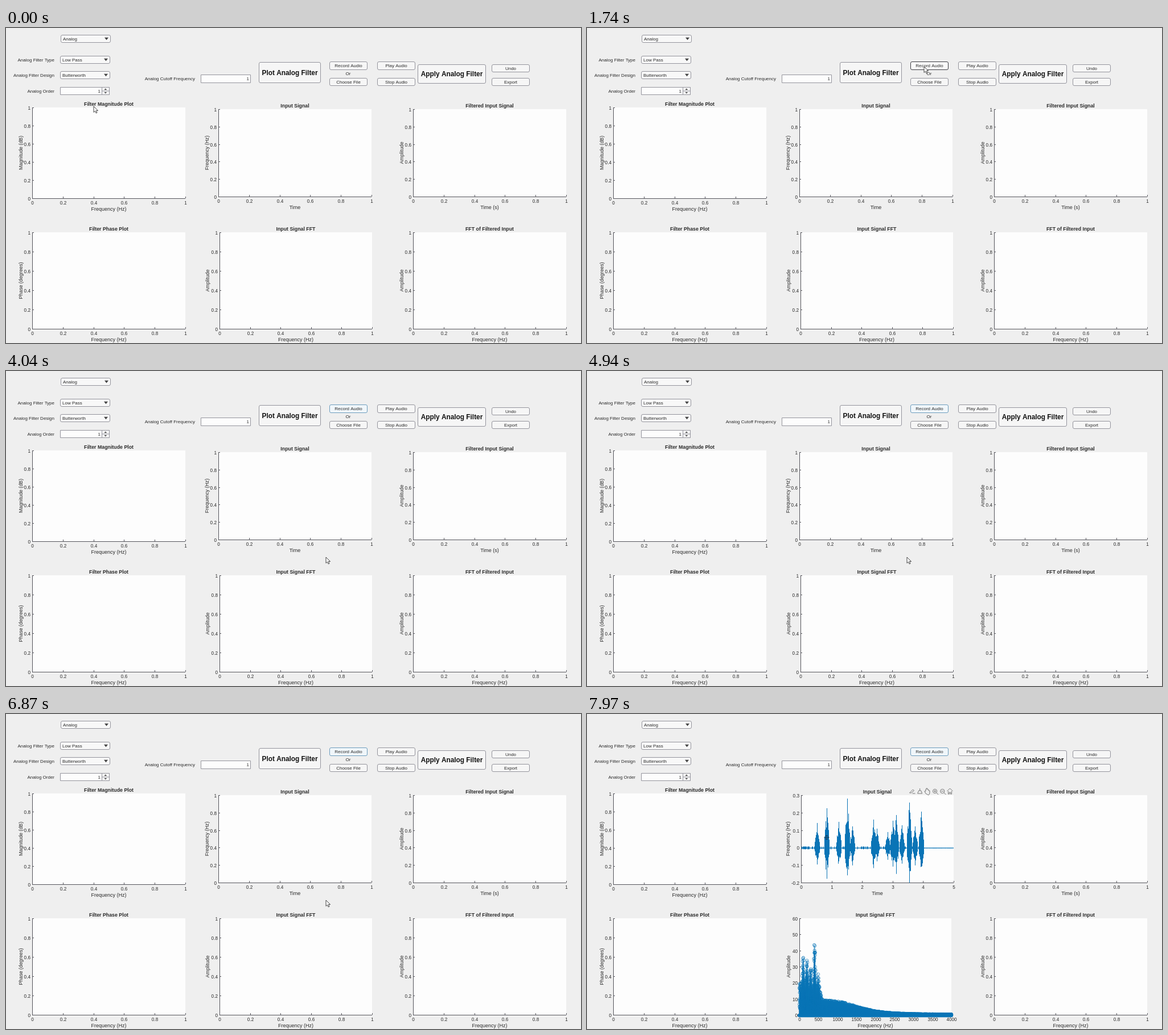
Write an HTML page with a canvas that moves like this. It is 1010 px wide and 555 px high and loops after 8000 ms.

```html
<!DOCTYPE html>
<html lang="en">
<head>
<meta charset="utf-8">
<title>Analog filter panel</title>
<style>
html, body { margin: 0; height: 100%; overflow: hidden; background: #efefef; }
canvas { display: block; }
</style>
</head>
<body>
<canvas id="stage" width="1010" height="555"></canvas>
<script>
const ctx = document.getElementById('stage').getContext('2d');
const FONT = '"Liberation Sans", Arial, sans-serif';
const BLUE = '#0a74b6', INK = '#2b2b2b', EDGE = '#94949c';
const LOOP = 8000, HOVER = 1620, CLICK = 2050, SIGNAL = 7340, FFT = 7430, TOOLS = 7700;

function text(str, x, y, size = 8, { align = 'center', bold = false, turn = 0 } = {}) {
  ctx.save();
  ctx.translate(x, y);
  ctx.rotate(turn);
  ctx.font = `${bold ? 'bold ' : ''}${size}px ${FONT}`;
  ctx.textAlign = align;
  ctx.fillStyle = size > 10 ? '#111' : INK;
  ctx.fillText(str, 0, size * 0.36);
  ctx.restore();
}

function strokePath(path, color, width = 1) {
  ctx.strokeStyle = color;
  ctx.lineWidth = width;
  ctx.stroke(path);
}

function box(x, y, w, h, radius, fill = '#f6f6f6', edge = EDGE) {
  const path = new Path2D();
  path.roundRect(x + 0.5, y + 0.5, w, h, radius);
  ctx.fillStyle = fill;
  ctx.fill(path);
  strokePath(path, edge);
}

function triangle(x, y, w, h) {
  ctx.beginPath();
  ctx.moveTo(x - w, y - h);
  ctx.lineTo(x + w, y - h);
  ctx.lineTo(x, y + h);
  ctx.fillStyle = '#444';
  ctx.fill();
}

function button(label, x, y, w = 66, h = 13, size = 8, fill, edge) {
  box(x, y, w, h, 2.5, fill, edge);
  text(label, x + w / 2 + 0.5, y + h / 2 + 0.5, size, { bold: size > 10 });
}

function dropdown(label, x, y) {
  box(x, y, 87, 13, 2.5, '#f8f8f8');
  text(label, x + 4, y + 7, 8, { align: 'left' });
  triangle(x + 80.5, y + 7, 3.5, 2.2);
}

function field(label, x, y, w, h, labelX, valueX) {
  const middle = y + h / 2 + 0.5;
  box(x, y, w, h, 0, '#fdfdfd');
  text(label, labelX, middle, 8, { align: 'right' });
  text('1', valueX, middle, 8, { align: 'right' });
}

function controls(t) {
  dropdown('Analog', 96, 12);
  dropdown('Low Pass', 95, 49);
  dropdown('Butterworth', 95, 76);
  text('Analog Filter Type', 85, 56.5, 8, { align: 'right' });
  text('Analog Filter Design', 85, 83, 8, { align: 'right' });
  field('Analog Cutoff Frequency', 342, 82, 87, 14, 332, 427);
  field('Analog Order', 95, 104, 86, 13, 85, 166);
  box(168, 104, 13, 13, 0);
  ctx.fillStyle = EDGE;
  ctx.fillRect(168, 110.5, 13, 1);
  for (const side of [-1, 1]) triangle(174.8, 111 + side * 3.3, 2.4, side * 1.3);

  button('Plot Analog Filter', 444, 60, 108, 36, 11.85);
  button('Apply Analog Filter', 723, 64, 119, 33, 11.85);
  const state = t >= CLICK ? ['#f0f6fa', '#6c9cbd'] : t >= HOVER ? ['#fafafa', '#3c3c42'] : [];
  button('Record Audio', 568, 59, 66, 14, 8, ...state);
  text('Or', 601, 80.5);
  button('Choose File', 568, 88);
  button('Play Audio', 652, 59, 66, 14);
  button('Stop Audio', 652, 88);
  button('Undo', 853, 64);
  button('Export', 853, 88);
}

// Scale: first value, step, number of ticks.
const UNIT = [0, 0.2, 6];

function axes(title, xName, yName, x, y, w, h, nameX, xScale = UNIT, yScale = UNIT) {
  const lines = new Path2D();
  const eachTick = ([first, step, count], mark) => {
    for (let i = 0; i < count; i++) mark(i / (count - 1), String(+(first + step * i).toFixed(1)));
  };
  ctx.fillStyle = '#fdfdfd';
  ctx.fillRect(x, y, w, h);
  lines.moveTo(x + 0.5, y);
  lines.lineTo(x + 0.5, y + h + 0.5);
  lines.lineTo(x + w, y + h + 0.5);
  eachTick(xScale, (part, label) => {
    const px = Math.round(x + w * part) + 0.5;
    lines.moveTo(px, y + h);
    lines.lineTo(px, y + h - 3);
    text(label, px, y + h + 8.5, 8.2);
  });
  eachTick(yScale, (part, label) => {
    const py = Math.round(y + h - h * part) + 0.5;
    lines.moveTo(x, py);
    lines.lineTo(x + 3, py);
    text(label, x - 3, py + 0.5, 8.2, { align: 'right' });
  });
  strokePath(lines, '#55555c');
  text(title, x + w / 2, y - 6.5, 8.8, { bold: true });
  text(xName, x + w / 2, y + h + 19, 9);
  text(yName, nameX, y + h / 2, 8.8, { turn: -Math.PI / 2 });
}

const noise = n => { const s = Math.sin(n * 127.1 + 11.3) * 43758.5453; return s - Math.floor(s); };

// Loudest moments of the recording: x, height.
const BURSTS = [
  [404, 44], [421, 70], [442, 46], [457, 87], [466, 38], [503, 50], [509, 34],
  [528, 28], [537, 48], [543, 58], [553, 40], [566, 80], [576, 38], [587, 64]
];

function signalPath() {
  const path = new Path2D();
  for (let x = 376; x < 644; x++) {
    let height = noise(x) < 0.4 && x < 594 ? 2.5 : 0.5;
    for (const [center, peak] of BURSTS) {
      const d = Math.abs(x - center) / 5;
      if (d < 1) height = Math.max(height, peak * (1 - d) ** 0.7 * (d ? 0.6 + 0.4 * noise(x + 50) : 1));
    }
    path.moveTo(x + 0.5, 236 - height);
    path.lineTo(x + 0.5, 236.5 + height * (0.5 + 0.3 * noise(x + 90)));
  }
  return path;
}

// Voice harmonics every 100 Hz above a plateau that rolls off.
const HARMONICS = [23, 15, 9, 30, 8];

function amplitude(hz) {
  const plateau = 11 * Math.exp(-((hz / 560) ** 12)) + 9 / (1 + (hz / 1600) ** 5) + 0.4;
  return HARMONICS.reduce((sum, h, i) => sum + h * Math.exp(-(((hz - 100 * (i + 1)) / 24) ** 2)), plateau);
}

function spectrumPaths() {
  const stems = new Path2D(), rings = new Path2D();
  const columns = 800;
  for (let i = 0; i < columns * 3; i++) {
    const part = (i % columns) / columns;
    const x = 373 + 267.5 * part;
    const y = 530.5 - 2.833 * amplitude(4000 * part) * (i < columns ? 0.65 + 0.35 * noise(i) : noise(i));
    stems.moveTo(x, 531);
    stems.lineTo(x, y);
    rings.moveTo(x + 2.6, y);
    rings.arc(x, y, 2.6, 0, 7);
    rings.moveTo(x + 2.6, 531);
    rings.arc(x, 531, 2.6, 0, 7);
  }
  return { stems, rings };
}

const signal = signalPath(), spectrum = spectrumPaths();

function plots(t) {
  const hz = 'Frequency (Hz)';
  axes('Filter Magnitude Plot', hz, 'Magnitude (dB)', 46, 140, 269, 160, 26);
  axes('Filtered Input Signal', 'Time (s)', 'Amplitude', 715, 143, 269, 154, 695);
  axes('Filter Phase Plot', hz, 'Phase (degrees)', 46, 360, 269, 170, 26);
  axes('FFT of Filtered Input', hz, 'Amplitude', 715, 360, 269, 170, 695);
  if (t < SIGNAL) {
    axes('Input Signal', 'Time', hz, 373, 143, 269, 154, 353);
  } else {
    axes('Input Signal', 'Time', hz, 376, 143, 268, 154, 353, [0, 1, 6], [-0.2, 0.1, 6]);
    strokePath(signal, BLUE);
  }
  if (t < FFT) {
    axes('Input Signal FFT', hz, 'Amplitude', 375, 360, 268, 170, 354);
  } else {
    axes('Input Signal FFT', hz, 'Amplitude', 373, 360, 267, 170, 354, [0, 500, 9], [0, 10, 7]);
    strokePath(spectrum.stems, BLUE, 0.7);
    strokePath(spectrum.rings, BLUE, 0.7);
  }
}

const ARROW = new Path2D('M0 0V10.5L2.5 8.3 4.2 12 6 11.2 4.3 7.6H7.6Z');
const CROSS = new Path2D('M-4.5 0H4.5M0-4.5V4.5M-3-2V2M3-2V2M-2-3H2M-2 3H2');
const LENS = 'm3.6 0a3.6 3.6 0 1 0-7.2 0a3.6 3.6 0 1 0 7.2 0m-1 2.5l3.5 3.5m-8-6h4';
const ICONS = [
  'm-5 3l6-6 2 2-5 4zm5 1h5',
  'm0-5v4m-2 0h4l2 5h-8z',
  'm-3 4l-2-4h2v-3h1v-2h2v2h2v2h2v5l-2 3z',
  LENS + 'm-2-2v4',
  LENS,
  'm-5 0l5-5 5 5m-8 0v5h2v-3h2v3h2v-5'
].map((shape, i) => new Path2D(`M${571.5 + i * 13.2} 136${shape}`));

// Pointer moves: start, end, target x, target y.
const MOVES = [
  [250, 800, 169, 25], [1150, 1640, 592, 68], [2450, 2850, 610, 69],
  [2980, 3330, 562, 328], [7470, 7850, 421, 217.5]
];

function pointer(t) {
  let x = 154, y = 138;
  for (const [start, end, toX, toY] of MOVES) {
    const p = Math.min(1, Math.max(0, (t - start) / (end - start)));
    const ease = p * p * (3 - 2 * p);
    x += (toX - x) * ease;
    y += (toY - y) * ease;
  }
  ctx.save();
  ctx.translate(x, y);
  if (t >= TOOLS) {
    strokePath(CROSS, '#173f5c');
  } else {
    ctx.fillStyle = '#fff';
    ctx.fill(ARROW);
    strokePath(ARROW, '#333', 0.9);
  }
  ctx.restore();
}

function draw(now) {
  const t = now % LOOP;
  ctx.fillStyle = '#efefef';
  ctx.fillRect(0, 0, 1010, 555);
  controls(t);
  plots(t);
  if (t >= TOOLS) ICONS.forEach(icon => strokePath(icon, '#777'));
  pointer(t);
  requestAnimationFrame(draw);
}
requestAnimationFrame(draw);
</script>
</body>
</html>
```
